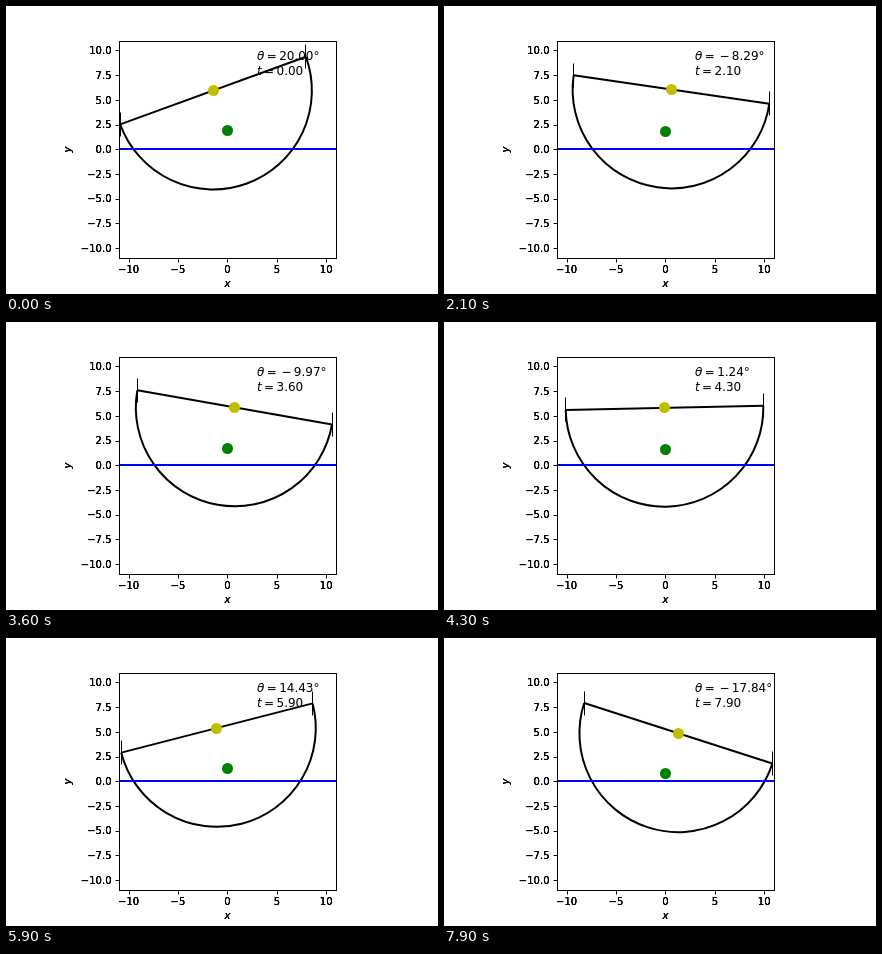
Animation of 432 by 288 pixels, one loop 8 s. Source, as an HTML page with a canvas:

```html
<!DOCTYPE html>
<html lang="en">
<head>
<meta charset="utf-8">
<title>Rocking half-disc</title>
<style>
  html, body { margin: 0; width: 100%; height: 100%; overflow: hidden; background: #fff; }
  canvas { display: block; width: 432px; height: 288px; }
</style>
</head>
<body>
<canvas id="stage"></canvas>
<script>
const W = 432, H = 288, LOOP = 8000, STEP = 100;
const FONT = '"DejaVu Sans", Verdana, sans-serif';
const BOX = { left: 113.5, right: 330.5, top: 35.5, bottom: 252.5 };
const UNIT = 217.44 / 22;
const R = 10, D = 4 * R / (3 * Math.PI); // radius, centre to centroid

// time (s), tilt (deg), tilt rate (deg/s)
const SWING = [
  [0, 20, 0], [1.3, 7.24, -19], [2.9, -15.41, 2], [4.3, 1.24, 18.5],
  [5.4, 16.2, 2.5], [5.9, 14.43, -8], [6.8, -0.34, -21], [7.9, -17.84, -3]
];

const canvas = document.getElementById('stage');
const ctx = canvas.getContext('2d');
const dpr = window.devicePixelRatio || 1;
canvas.width = W * dpr;
canvas.height = H * dpr;
ctx.scale(dpr, dpr);

const px = x => 221.4 + x * UNIT;
const py = y => 143.28 - y * UNIT;
const snap = v => Math.floor(v) + 0.5;
const snapLine = v => Math.round(v) + 0.5;

function tiltAt(t) {
  let i = 0;
  while (i < SWING.length - 2 && t > SWING[i + 1][0]) i++;
  const [t0, a, va] = SWING[i], [t1, b, vb] = SWING[i + 1];
  const h = t1 - t0, u = (t - t0) / h, w = 1 - u;
  return w * w * (1 + 2 * u) * a + u * u * (3 - 2 * u) * b
    + h * u * w * (w * va - u * vb);
}

const heightAt = t => 1.95 - 0.0275 * Math.pow(t, 1.8);

function line(x1, y1, x2, y2, width = 1, color = '#000') {
  ctx.beginPath();
  ctx.moveTo(x1, y1);
  ctx.lineTo(x2, y2);
  ctx.lineWidth = width;
  ctx.strokeStyle = color;
  ctx.stroke();
}

function dot(x, y, color) {
  ctx.beginPath();
  ctx.arc(snap(x), snap(y), 5.5, 0, 2 * Math.PI);
  ctx.fillStyle = color;
  ctx.fill();
}

// Repeated drawing gives the axis labels their heavy edges.
function label(text, x, y, align) {
  ctx.textAlign = align;
  for (let i = 0; i < 3; i++) ctx.fillText(text, x, y);
}

function drawAxes() {
  ctx.fillStyle = '#000';
  ctx.font = `10px ${FONT}`;
  for (let v = -10; v <= 10; v += 2.5) {
    const y = snapLine(py(v));
    line(109.5, y, 113.5, y);
    label(v.toFixed(1).replace('-', '\u2212'), 105.5, py(v) + 3.7, 'right');
  }
  for (let v = -10; v <= 10; v += 5) {
    const x = snapLine(px(v));
    line(x, 252.5, x, 256.5);
    label(String(v).replace('-', '\u2212'), px(v), 267, 'center');
  }
  ctx.font = `italic 10px ${FONT}`;
  label('x', px(0), 281, 'center');
  ctx.save();
  ctx.translate(65.3, 143.5);
  ctx.rotate(-Math.PI / 2);
  label('y', 0, 0, 'center');
  ctx.restore();
}

function drawBody(tilt, cy) {
  const a = tilt * Math.PI / 180;
  const ox = px(-D * Math.sin(a)), oy = py(cy + D * Math.cos(a));
  const dx = R * UNIT * Math.cos(a), dy = R * UNIT * Math.sin(a);

  ctx.beginPath();
  ctx.arc(ox, oy, R * UNIT, -a, Math.PI - a);
  ctx.lineWidth = 2;
  ctx.strokeStyle = '#000';
  ctx.stroke();
  line(ox - dx, oy + dy, ox + dx, oy - dy, 2);
  for (const s of [-1, 1]) {
    const x = snap(ox + s * dx), y = snap(oy - s * dy);
    line(x, y - 12, x, y + 12);
  }
  line(BOX.left, 143, BOX.right, 143, 2, '#00f');
  dot(px(0), py(cy), '#008000');
  dot(ox, oy, '#bfbf00');
}

// Formula text: italic name, then spaced operators, then the number.
function formula(name, value, y) {
  const gap = 2.34;
  let x = px(3);
  const put = (text, style = '') => {
    ctx.font = `${style} 12px ${FONT}`;
    ctx.fillText(text, x, y);
    x += ctx.measureText(text).width;
  };
  ctx.textAlign = 'left';
  ctx.fillStyle = '#000';
  put(name, 'italic');
  x += gap;
  put('=');
  x += gap;
  if (value[0] === '-') {
    x += gap;
    put('\u2212');
    x += gap;
    value = value.slice(1);
  }
  put(value);
}

function draw(ms) {
  const t = Math.floor((ms % LOOP) / STEP) * STEP / 1000;
  const tilt = tiltAt(t);
  ctx.fillStyle = '#fff';
  ctx.fillRect(0, 0, W, H);
  drawAxes();
  drawBody(tilt, heightAt(t));
  ctx.lineWidth = 1;
  ctx.strokeStyle = '#000';
  ctx.strokeRect(BOX.left, BOX.top, BOX.right - BOX.left, BOX.bottom - BOX.top);
  formula('\u03b8', tilt.toFixed(2) + '\u00b0', 54.3);
  formula('t', t.toFixed(2), 69.2);
}

let start = null;
function tick(now) {
  if (start === null) start = now;
  draw(now - start);
  requestAnimationFrame(tick);
}
draw(0);
requestAnimationFrame(tick);
</script>
</body>
</html>
```
